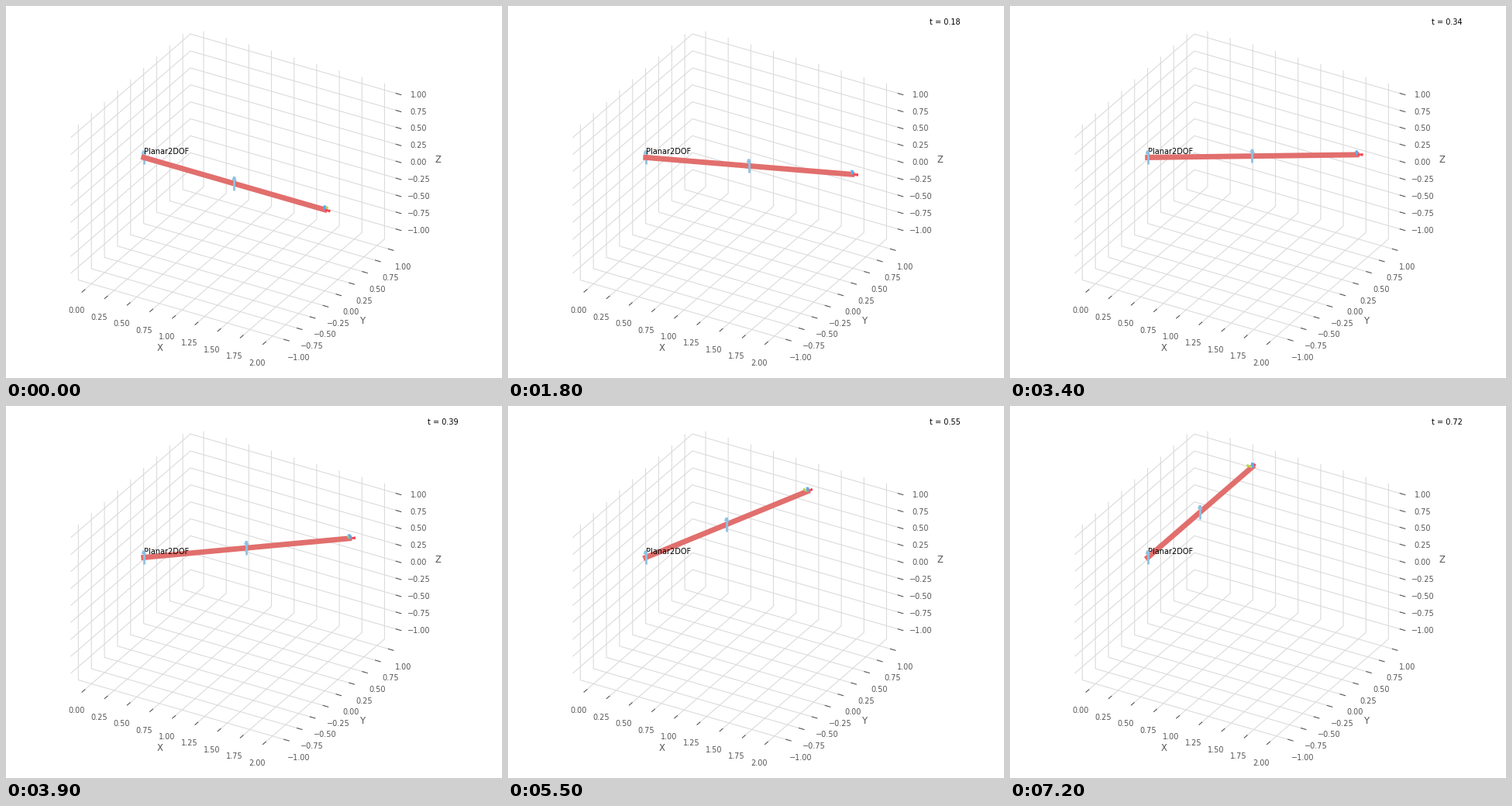
Write a matplotlib script that moves like this. It is 640x480 px and loops after 7.3 s.

```python
import numpy as np
import matplotlib.pyplot as plt
from matplotlib.animation import FuncAnimation

FRAMES = 73
SPEED = np.pi / 100      # top joint speed, rad per frame
RAMP = 10                # frames to reach top speed
VIA = np.pi / 8
GOAL = np.pi / 2
SECOND_START = 24

LINK, JOINT = "#E16F6D", "#8FC1E2"
EE_COLORS = ("#F84752", "#BADA55", "#54AEFF")

plt.style.use("ggplot")
plt.rcParams.update({
    "font.size": 7,
    "grid.color": "#dbdbdb",
    "grid.linestyle": "-",
    "axes.labelpad": 1,
})


def ramped(t, dist):
    """Distance covered with constant acceleration, cruise, deceleration."""
    total = dist / SPEED + RAMP
    t = np.clip(t, 0, total)
    acc = SPEED / RAMP
    if t < RAMP:
        return acc * t ** 2 / 2
    if t > total - RAMP:
        return dist - acc * (total - t) ** 2 / 2
    return SPEED * (t - RAMP / 2)


def joint_angle(i):
    return ramped(i, VIA) + ramped(i - SECOND_START, GOAL - VIA)


fig = plt.figure(figsize=(6.4, 4.8), dpi=100, facecolor="white")
fig.subplots_adjust(left=-0.09, bottom=0, top=1, right=0.99)
ax = fig.add_subplot(projection="3d", proj_type="ortho")
ax.set_facecolor("white")

links, = ax.plot([0, 1, 2], [0, 0, 0], [0, 0, 0], color=LINK, lw=5)
ax.text(0, 0, 0.05, "Planar2DOF")
timer = fig.text(0.85, 0.95, "")

pad = 2.2 / 48
ax.set_xlim(-0.1 - pad, 2.1 + pad)
ax.set_ylim(-1.1 - pad, 1.1 + pad)
ax.set_zlim(-1.15 - pad, 1.05 + pad)
ax.set_xticks(np.linspace(0, 2, 9))
ax.set_yticks(np.linspace(-1, 1, 9))
ax.set_zticks(np.linspace(-1, 1, 9))
ax.set(xlabel="X", ylabel="Y", zlabel="Z")
for axis in (ax.xaxis, ax.yaxis, ax.zaxis):
    axis.set_pane_color((1, 1, 1, 1))

arrows = []


def add_arrow(start, vec, color):
    arrows.append(ax.quiver(*start, *vec, color=color, linewidth=2))


def draw(i):
    while arrows:
        arrows.pop().remove()

    q = joint_angle(i)
    c, s = np.cos(q), np.sin(q)
    along = np.array([c, s, 0])
    across = np.array([-s, c, 0])
    up = np.array([0, 0, 1])

    points = np.outer([0, 1, 2], along)
    links.set_data_3d(*points.T)
    for p in points[:2]:
        add_arrow(p - 0.1 * up, 0.2 * up, JOINT)
    for vec, color in zip((along, across, up), EE_COLORS):
        add_arrow(points[2], 0.06 * vec, color)

    timer.set_text(f"t = {i / 100:.2f}" if i else "")
    return [links, timer, *arrows]


anim = FuncAnimation(fig, draw, frames=FRAMES, interval=100,
                     init_func=lambda: draw(0), repeat=True, repeat_delay=0)
plt.show()
```
